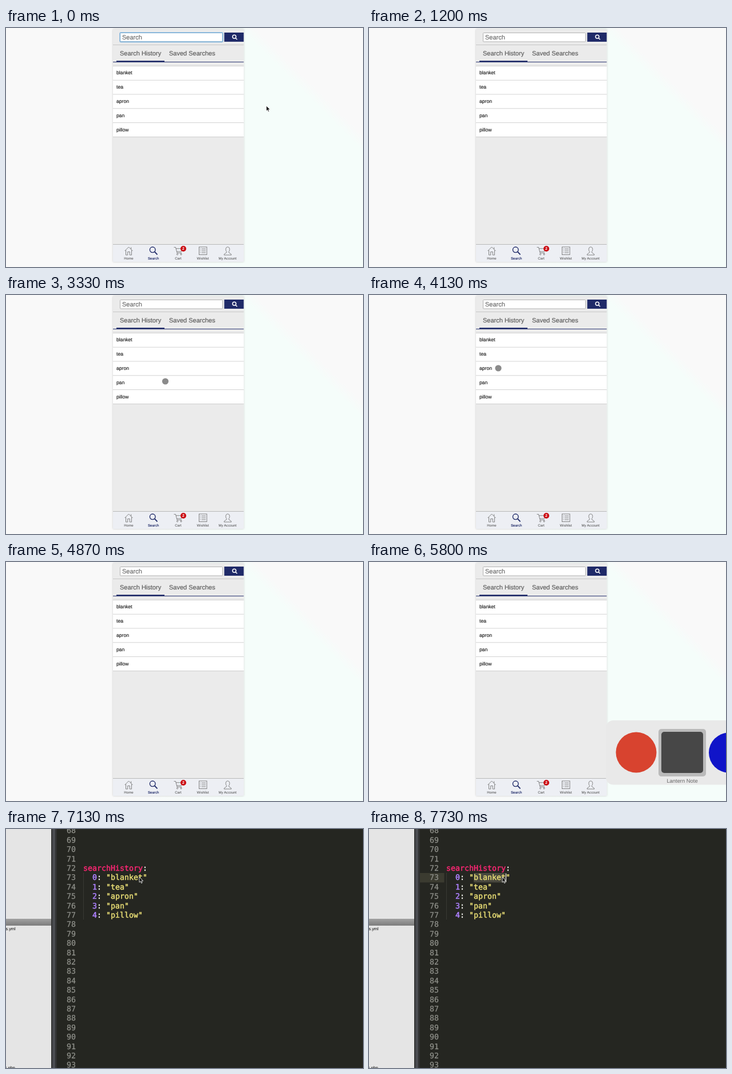
An HTML page for the animation above (8 s loop, 624 by 418 pixels).

```html
<!DOCTYPE html>
<html lang="en">
<head>
<meta charset="utf-8">
<title>Search history</title>
<style>
html, body { margin: 0; width: 100%; height: 100%; overflow: hidden; background: #f9f9f9; }
svg { display: block; width: 624px; height: 418px; }
text { font-family: "Liberation Sans", Arial, sans-serif; text-rendering: geometricPrecision; white-space: pre; }
.code text { font: 13.29px "DejaVu Sans Mono", monospace; stroke-width: .25; }
.big { font-size: 11px; fill: #5e5e5e; stroke: #5e5e5e; stroke-width: .2; }
.item { font-size: 8.6px; fill: #111; stroke: #111; stroke-width: .12; }
.nav { font-size: 6.1px; fill: #444; text-anchor: middle; }
.nav.on { fill: #1f2a68; stroke: #1f2a68; stroke-width: .15; }
.icon { fill: none; stroke: #777; stroke-width: .9; }
.key { fill: #f92672; stroke: #f92672; }
.num { fill: #ae81ff; stroke: #ae81ff; }
.str { fill: #e6db74; stroke: #e6db74; }
.pun { fill: #f8f8f2; stroke: #f8f8f2; }
.key, .num, .str, .pun { stroke-width: .5; }
.line { fill: #8f908a; stroke: #8f908a; text-anchor: end; }
</style>
</head>
<body>
<svg viewBox="0 0 624 418">
  <defs>
    <linearGradient id="mint" gradientUnits="userSpaceOnUse" x1="187" y1="0" x2="420" y2="0">
      <stop offset="0" stop-color="#f9f9f9"/><stop offset="1" stop-color="#f5fdfa"/>
    </linearGradient>
    <linearGradient id="corner" gradientUnits="userSpaceOnUse" x1="515" y1="107" x2="529" y2="93">
      <stop offset="0" stop-color="#f9f9f9" stop-opacity="0"/><stop offset="1" stop-color="#f9f9f9"/>
    </linearGradient>
    <linearGradient id="bar" x2="0" y2="1">
      <stop offset="0" stop-color="#a2a2a2"/><stop offset="1" stop-color="#7c7c7c"/>
    </linearGradient>
    <filter id="shade" x="-5%" y="-5%" width="110%" height="110%">
      <feDropShadow dx="0" dy="0" stdDeviation="1.4" flood-opacity=".2"/>
    </filter>
  </defs>

  <g id="phone">
    <rect width="624" height="418" fill="#f9f9f9"/>
    <rect x="187" width="437" height="418" fill="url(#mint)"/>
    <path d="M400 0H624V224Z" fill="url(#corner)"/>
    <rect x="187" y="2" width="228.5" height="407" fill="#ebebeb" filter="url(#shade)"/>
    <path d="M187 29.5H415.5" stroke="#c6c6c6"/>
    <rect x="199.5" y="8.5" width="179" height="15.5" rx="1" fill="#fff" stroke="#b2b2b2"/>
    <g id="focus" fill="none">
      <rect x="199" y="8" width="180" height="16.5" rx="1.5" stroke="#a9cbe8" stroke-width="1.8"/>
      <rect x="199.5" y="8.5" width="179" height="15.5" rx="1" stroke="#6ba3cc"/>
    </g>
    <text class="big" x="203" y="19.7" style="fill:#777">Search</text>
    <path id="caret" d="M203.5 10.5V22" stroke="#222" stroke-width=".8"/>
    <rect x="381.5" y="8" width="34" height="16" fill="#1f2a68"/>
    <g fill="none" stroke="#fff" stroke-width="1.5">
      <circle cx="399" cy="15.3" r="3"/><path d="M401.2 17.5L404 20.3"/>
    </g>
    <text class="big" x="199" y="47.8">Search History</text>
    <text class="big" x="285" y="48.2" textLength="auto">Saved Searches</text>
    <path d="M187 59.5H415.5" stroke="#2b3672"/>
    <path d="M193 58.3H277" stroke="#1f2a68" stroke-width="2.2"/>
    <g id="list"></g>

    <rect x="187" y="378" width="228.5" height="31" fill="#edeff4"/>
    <path d="M187 378.5H415.5" stroke="#b9b9b9"/>
    <g class="icon">
      <path d="M207.5 390L214.5 383L221.5 390M209.5 388.5V397H212.7V391.5H216.3V397H219.5V388.5M218.7 387V383.5"/>
      <g stroke="#1f2a68" stroke-width="1.4"><circle cx="256.2" cy="387.8" r="4.8"/><path d="M259.8 391.4L264.5 396.3" stroke-width="1.8"/></g>
      <path d="M293.5 383.5H296.5L299 393.3H307M297 385.8H308.5L306.5 391H298.5"/>
      <circle cx="299.5" cy="395.7" r="1.2"/><circle cx="306" cy="395.7" r="1.2"/>
      <rect x="337.5" y="383" width="13.5" height="13.5"/>
      <path d="M342 386.5H349M342 389.8H349M342 393H349M339.3 386.5H340.7M339.3 389.8H340.7M339.3 393H340.7"/>
      <path d="M381 397C381 394 385.8 394 385.8 391.7C383.3 389 383.4 383 387.5 383S391.7 389 389.2 391.7C389.2 394 394 394 394 397Z"/>
    </g>
    <circle cx="310" cy="386" r="5" fill="#cb0c12"/>
    <text x="310" y="388.4" font-size="6.8" font-weight="bold" fill="#fff" text-anchor="middle">2</text>
    <g id="tabs"></g>
  </g>

  <g id="switcher">
    <rect x="414" y="277" width="230" height="112.5" rx="13" fill="#e9e9e9"/>
    <circle cx="467" cy="333" r="35.5" fill="#d8432f"/>
    <rect x="506" y="292" width="83" height="83" rx="5" fill="#bababa"/>
    <rect x="511" y="297" width="73" height="72" rx="5" fill="#474747"/>
    <circle cx="629" cy="333.5" r="35" fill="#1014c8"/>
    <text x="547.5" y="385.7" font-size="9.4" fill="#666" text-anchor="middle">Lantern Note</text>
  </g>

  <g id="editor">
    <rect width="624" height="418" fill="#252621"/>
    <rect width="79" height="418" fill="#e5e5e5"/>
    <rect y="157" width="79" height="12" fill="url(#bar)"/>
    <rect x="79" width="10" height="418" fill="#303131"/>
    <rect x="81" width="5" height="418" fill="#4a4c50"/>
    <text x="-.5" y="176.6" font-size="7.3">s.yml</text>
    <text x="-2" y="419.6" font-size="7.3">s.php</text>
    <rect id="active" x="89" y="77" width="42.5" height="16.5" fill="#3b3b30"/>
    <rect id="selection" x="183" y="77" width="56.5" height="16.5" rx="2" fill="#49483e"/>
    <path d="M135.5 77V159" stroke="#4b4c45" stroke-dasharray="1 1"/>
    <g id="code" class="code"></g>
    <path id="bead" d="M239.5 77.5V93" stroke="#f8f8f0"/>
  </g>

  <path id="arrow" d="M0 0V9.3L2.1 7.4L3.6 10.8L5.1 10.1L3.7 6.8H6.7Z" fill="#111" stroke="#fff" stroke-width=".8"/>
  <circle id="touch" r="5.6" fill="#8b8b8b"/>
</svg>
<script>
const $ = id => document.getElementById(id);
const words = ["blanket", "tea", "apron", "pan", "pillow"];

$("list").innerHTML = '<path d="M187 66.5H415.5" stroke="#cfcfcf"/>' + words.map((word, i) => {
  const y = 67 + i * 24.8;
  return `<rect x="187" y="${y}" width="228.5" height="24" fill="#fff"/>
    <path d="M187 ${y + 24.3}H415.5" stroke="#cfcfcf"/>
    <text class="item" x="193" y="${81 + i * 24.9}">${word}</text>`;
}).join("");

$("tabs").innerHTML = ["Home", "Search", "Cart", "Wishlist", "My Account"].map((name, i) =>
  `<text class="nav${i == 1 ? " on" : ""}" x="${214.5 + i * 43.2}" y="405">${name}</text>`
).join("");

const lineY = n => 73 + (n - 72) * 16.4;
const span = (type, s) => `<tspan class="${type}">${s}</tspan>`;
let code = `<text x="135" y="${lineY(72)}">${span("key", "searchHistory")}${span("pun", ":")}</text>`;
words.forEach((word, i) => {
  code += `<text x="151" y="${lineY(73 + i)}">${span("num", i)}${span("pun", ": ")}${span("str", `"${word}"`)}</text>`;
});
for (let n = 68; n < 94; n++) {
  code += `<text class="line" x="122" y="${lineY(n)}">${n}</text>`;
}
$("code").innerHTML = code;

// Pointer paths: [tick, x, y]; a path is hidden from its last tick on.
const arrowPaths = [
  [[0, 455, 136], [1, 515, 152], [2, 577, 170], [3, 577, 170]],
  [[34, 441, 411], [36, 450, 383], [38, 456, 408], [39, 456, 418]],
  [[100, 340, 418], [103, 290, 230], [107, 233, 84], [999, 233, 84]]
];
const touchPaths = [
  [[50, 278.5, 151], [54, 240, 47], [57, 225, 80], [62, 226, 128], [64, 220, 170], [68, 262, 290], [72, 359, 397], [73, 359, 397]]
];

function locate(paths, tick) {
  const path = paths.find(p => tick >= p[0][0] && tick < p.at(-1)[0]);
  if (!path) return null;
  const i = path.findIndex(p => p[0] > tick);
  const [t0, x0, y0] = path[i - 1], [t1, x1, y1] = path[i];
  const k = (tick - t0) / (t1 - t0);
  return [x0 + (x1 - x0) * k, y0 + (y1 - y0) * k];
}

const show = (id, on) => { $(id).style.display = on ? "" : "none"; };

function place(id, paths, tick) {
  const at = locate(paths, tick);
  show(id, at);
  if (at) $(id).setAttribute("transform", `translate(${at})`);
}

function draw(now) {
  // The screen updates 15 times a second.
  const tick = Math.floor((now % 8000 + 5) * .015);
  $("focus").style.opacity = Math.max(0, Math.min(1, (18 - tick) / 3));
  show("caret", tick >= 2 && tick < 10);
  show("switcher", tick >= 87);
  show("editor", tick >= 99);
  show("active", tick >= 109);
  show("bead", tick >= 109);
  show("selection", tick >= 114);
  place("arrow", arrowPaths, tick);
  place("touch", touchPaths, tick);
  requestAnimationFrame(draw);
}
draw(0);
</script>
</body>
</html>
```
